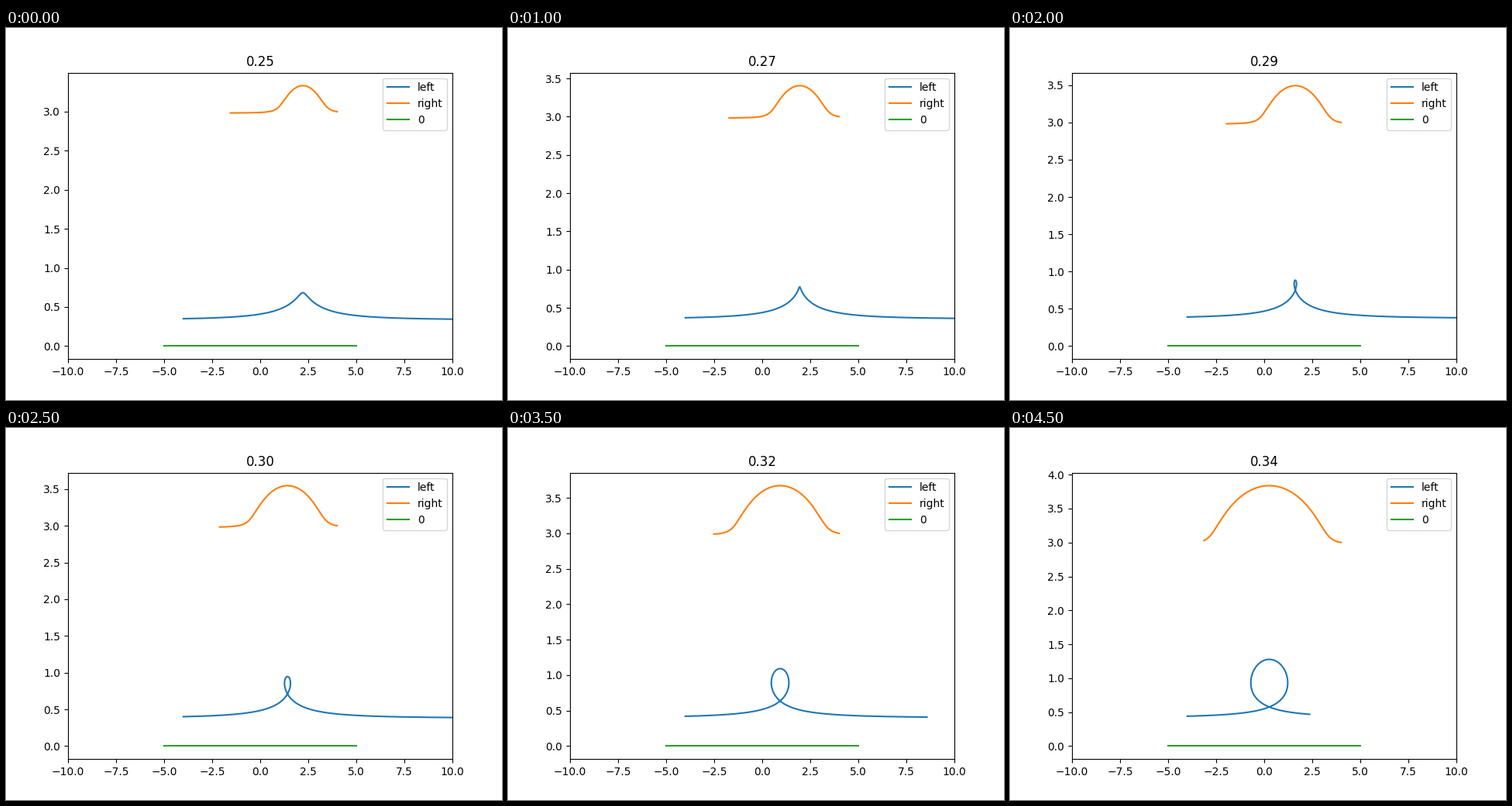
A matplotlib script for the animation above (5 s loop, 640 by 480 pixels).

```python
import numpy as np
import matplotlib.pyplot as plt
from matplotlib.animation import FuncAnimation

# Two opposite point vortices above a wall at y = 0, strength 2*pi.
HEIGHTS = 0.25 + 0.01 * np.arange(10)
T_END, STEPS = 30.0, 3000


def velocity(state):
    x1, y1, x2, y2 = state
    dx, gap, total = x2 - x1, y2 - y1, y1 + y2
    near = dx**2 + gap**2
    far = dx**2 + total**2
    u1 = 0.5 / y1 - gap / near - total / far
    u2 = -0.5 / y2 - gap / near + total / far
    v = dx / near - dx / far
    return np.array([u1, v, u2, v])


def integrate(heights):
    """Fourth-order Runge-Kutta for all starting heights at once."""
    one = np.ones_like(heights)
    path = np.empty((STEPS + 1, 4, len(heights)))
    path[0] = [-4 * one, heights + 0.1, 4 * one, 3 * one]
    dt = T_END / STEPS
    for i in range(STEPS):
        s = path[i]
        k1 = velocity(s)
        k2 = velocity(s + dt / 2 * k1)
        k3 = velocity(s + dt / 2 * k2)
        k4 = velocity(s + dt * k3)
        path[i + 1] = s + dt / 6 * (k1 + 2 * k2 + 2 * k3 + k4)
    return path


paths = integrate(HEIGHTS)
fig, ax = plt.subplots(figsize=(6.4, 4.8), dpi=100)


def draw(frame):
    x1, y1, x2, y2 = paths[:, :, frame].T
    ax.clear()
    ax.plot(x1, y1, label="left")
    ax.plot(x2, y2, label="right")
    ax.plot([-5, 5], [0, 0], label="0")
    ax.set_xlim(-10, 10)
    ax.set_title(f"{HEIGHTS[frame]:.2f}")
    ax.legend(loc="upper right")
    return ax.lines


anim = FuncAnimation(fig, draw, frames=len(HEIGHTS), interval=500,
                     repeat=True, repeat_delay=0)
plt.show()
```
